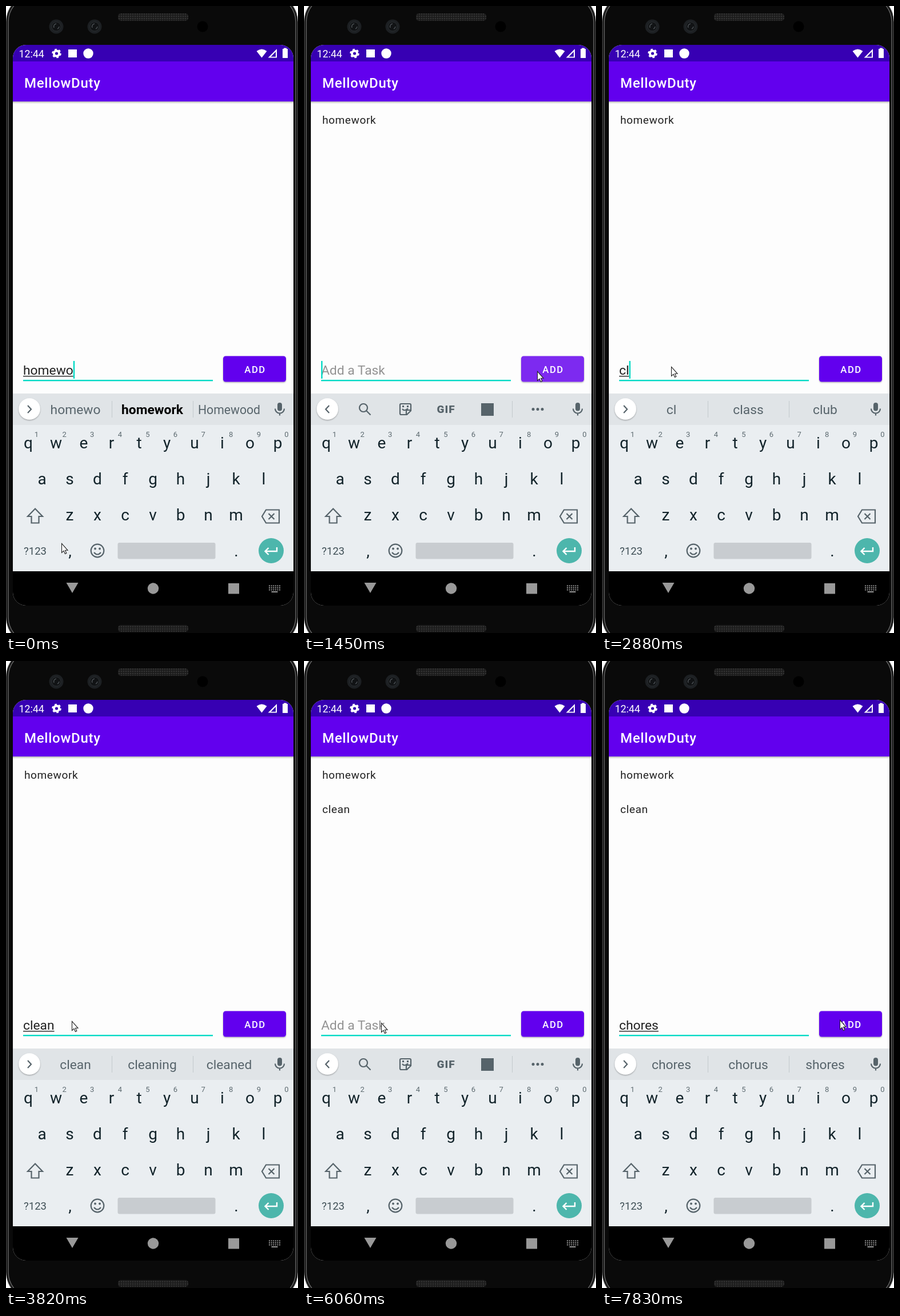
Animation of 511 by 1097 pixels, one loop 8000 ms. Source, as an HTML page:

```html
<!DOCTYPE html>
<html lang="en">
<head>
<meta charset="utf-8">
<title>To-do app</title>
<style>
html, body { margin: 0; width: 100%; height: 100%; overflow: hidden; background: #fff; }
svg { display: block; width: 511px; height: 1097px; font-family: Roboto, sans-serif; }
.mid { text-anchor: middle; }
.key { font-size: 28px; fill: #12232a; }
.digit { font-size: 13px; fill: #5d6a70; }
.line { fill: none; stroke: #56636a; stroke-width: 2.2; }
.grey { fill: #56636a; }
.white { fill: #fff; }
.item { font-size: 19.1px; letter-spacing: .03em; fill: #212121; }
.entry, .word { font-size: 22.8px; }
.word { fill: #57646b; text-anchor: middle; }
</style>
</head>
<body>
<svg viewBox="0 0 511 1097">
  <defs>
    <clipPath id="screen"><rect x="12" y="68" width="491" height="981" rx="23"/></clipPath>
    <filter id="soft" x="-20%" y="-20%" width="140%" height="150%">
      <feDropShadow dx="0" dy="1.2" stdDeviation="1.2" flood-opacity=".35"/>
    </filter>
    <linearGradient id="shade" x2="0" y2="1">
      <stop stop-opacity=".28"/><stop offset="1" stop-opacity="0"/>
    </linearGradient>
    <pattern id="mesh" width="4" height="4" patternUnits="userSpaceOnUse">
      <rect width="4" height="4" fill="#1b1b1b"/><circle cx="2" cy="2" r="1.3" fill="#343434"/>
    </pattern>
    <g id="lens">
      <circle r="12.5" fill="#1d2023"/><circle r="8" fill="#111315" stroke="#2b2f32"/>
      <path d="M-4 2A5 5 0 0 1 0-5M2 4A5 5 0 0 0 5 0" fill="none" stroke="#4a4f53" stroke-width="1.5"/>
    </g>
  </defs>

  <!-- Phone body -->
  <rect y="-22" width="511" height="1141" rx="50" fill="#3c3c3c"/>
  <rect x="1.5" y="-20" width="508" height="1137" rx="48" fill="#0c0c0c"/>
  <rect x="4" y="-18" width="503" height="1133" rx="46" fill="#0a0a0a" stroke="#626262" stroke-width="1.5"/>
  <rect x="196" y="13" width="123" height="13" rx="5" fill="url(#mesh)"/>
  <rect x="196" y="1083" width="123" height="12" rx="5" fill="url(#mesh)"/>
  <use href="#lens" x="88" y="36"/><use href="#lens" x="155" y="36"/>
  <circle cx="344" cy="36" r="9.5"/>

  <g clip-path="url(#screen)">
    <rect x="12" y="68" width="491" height="981" fill="#fdfdfd"/>
    <rect x="12" y="167" width="491" height="4" fill="url(#shade)"/>
    <rect x="12" y="68" width="491" height="30" fill="#3700b3"/>
    <rect x="12" y="97" width="491" height="70" fill="#6200ee"/>
    <rect x="12" y="678" width="491" height="55" fill="#e0e4e7"/>
    <rect x="12" y="733" width="491" height="256" fill="#eaeef1"/>
    <rect x="12" y="989" width="491" height="60"/>
  </g>

  <!-- Status and app bars -->
  <g class="white">
    <text x="22.5" y="90" font-size="17.8">12:44</text>
    <circle cx="88.5" cy="83" r="4.6" fill="none" stroke="#fff" stroke-width="4"/>
    <circle cx="88.5" cy="83" r="7" fill="none" stroke="#fff" stroke-width="2.6" stroke-dasharray="3.67"/>
    <rect x="109" y="76" width="15" height="14"/>
    <circle cx="144" cy="83" r="8.7"/>
    <path d="M438.500 79Q447.500 72 456.500 79L447.500 90.500Z"/>
    <path d="M474 75V90.500H458.500ZM472 80L463.500 88.700H472Z" fill-rule="evenodd"/>
    <path d="M486 75V73.500H491V75H493V91H484V75Z"/>
    <text x="32" y="142.500" font-size="24" font-weight="500" letter-spacing=".03em">MellowDuty</text>
  </g>

  <!-- Task list and entry row -->
  <text class="item" x="32" y="205.500" id="item1">homework</text>
  <text class="item" x="32" y="265.500" id="item2">clean</text>
  <text class="entry" x="30" y="645" id="entry"></text>
  <rect x="30" y="647" height="1.400" fill="#212121" id="composing"/>
  <rect x="30" y="654" width="332" height="2.400" fill="#03dac5"/>
  <rect y="621" width="2.400" height="31" fill="#03dac5" id="caret"/>
  <rect x="380" y="612.500" width="110" height="45" rx="4.500" filter="url(#soft)" id="button"/>
  <text class="mid white" x="436" y="642" font-size="16.700" font-weight="500" letter-spacing=".09em">ADD</text>

  <!-- Suggestion strip -->
  <circle class="white" cx="41" cy="705" r="18.800" filter="url(#soft)"/>
  <path class="line" stroke-width="2.500" id="chevron"/>
  <g id="words">
    <path d="M185.500 691V720M327.500 691V720" stroke="#c3c9cd"/>
    <text class="word" y="714"></text><text class="word" y="714"></text><text class="word" y="714"></text>
  </g>
  <g id="tools">
    <path d="M364.500 691V720" stroke="#c3c9cd"/>
    <circle class="line" cx="104" cy="703" r="7"/>
    <path class="line" d="M109 708L116.500 715.500"/>
    <path class="line" d="M170 696H185Q187 696 187 698V708L180 715H170Q168 715 168 713V698Q168 696 170 696ZM187 707H181Q179 707 179 709V715M172 705Q176 710 182 704"/>
    <path class="grey" d="M172 699H175V702H172ZM180 699H183V702H180Z"/>
    <text class="mid grey" x="248.500" y="712" font-size="19" font-weight="900" letter-spacing=".05em">GIF</text>
    <rect class="grey" x="310" y="695" width="22" height="22"/>
    <g class="grey"><circle cx="401" cy="705.500" r="2.500"/><circle cx="409" cy="705.500" r="2.500"/><circle cx="417" cy="705.500" r="2.500"/></g>
  </g>
  <rect class="grey" x="475" y="694" width="8" height="14.500" rx="4"/>
  <path class="line" d="M471 704.500A7.800 7.800 0 0 0 487 704.500M479 712V716.500"/>

  <!-- Keyboard -->
  <g id="keys"></g>
  <path class="line" d="M51 879.500L64 893H57.500V904.500H44.500V893H38Z"/>
  <path class="line" d="M455 881.500H478V904.500H455L448 893ZM459.500 888L469.500 898M469.500 888L459.500 898"/>
  <text class="mid" x="51" y="960" font-size="18.500" fill="#3f4f56">?123</text>
  <circle class="line" cx="160" cy="953" r="11.300"/>
  <circle class="grey" cx="156" cy="949.500" r="1.900"/><circle class="grey" cx="164" cy="949.500" r="1.900"/>
  <path class="line" d="M154 956Q160 963 166 956"/>
  <rect x="195.500" y="939" width="171" height="28.500" rx="3" fill="#c8ccd0"/>
  <circle cx="464" cy="953" r="22" fill="#4db6ac"/>
  <path d="M474 947V954H454M459.500 948L453.500 954L459.500 960" fill="none" stroke="#fff" stroke-width="2.400"/>

  <!-- Navigation bar -->
  <path d="M105.500 1009H126.500L116 1027ZM389 1010H408V1028.500H389Z" fill="#999"/>
  <circle cx="257.500" cy="1019" r="9.700" fill="#999"/>
  <path d="M460 1014.500H480M460 1018H480M460 1021.500H480" stroke="#999" stroke-width="2" stroke-dasharray="2 1.600"/>
  <path d="M464.500 1025H475.500" stroke="#999" stroke-width="2"/>

  <path id="mouse" d="M.5.500V16.500L4 13.200L6.400 18.500L8.800 17.400L6.500 12.300H11Z" fill="#fff" stroke="#222" stroke-width="1.100"/>
</svg>
<script>
const $ = id => document.getElementById(id);
const LOOP = 8000;

// Each track lists [start time, value]; a value holds until the next start.
const typed = [[0, 'homewo'], [120, 'homewor'], [240, 'homework'], [1450, ''],
  [2750, 'c'], [2880, 'cl'], [3020, 'cle'], [3150, 'clea'], [3270, 'clean'], [4470, ''],
  [6460, 'c'], [6610, 'cho'], [6760, 'chor'], [7030, 'chore'], [7150, 'chores']];
const caretOn = [[0, 1], [760, 0], [1150, 1], [1970, 0], [2370, 1], [3820, 0],
  [4350, 1], [5130, 0], [5660, 1], [6060, 0], [6460, 1], [7710, 0]];
const buttonFill = [[0, '#6200ee'], [1450, '#7d2af0'], [1700, '#6200ee'],
  [4470, '#7d2af0'], [4850, '#6e15ef'], [4980, '#6200ee']];
const pointer = [[0, [97, 940]], [640, [150, 850]], [760, [285, 660]], [880, [324, 603]],
  [1030, [360, 615]], [1150, [403, 635]], [1300, [408, 639]], [1580, [290, 675]],
  [1700, [124, 713]], [1840, [122, 665]], [1970, [121, 631]], [3820, [115, 630]],
  [3940, [118, 631]], [4090, [330, 632]], [4220, [482, 637]], [4350, [440, 638]],
  [4580, [400, 637]], [4700, [209, 633]], [4850, [150, 633]], [4980, [135, 633]],
  [7710, [290, 631]], [7830, [416, 628]]];

// A leading * marks the autocorrect choice.
const suggestions = {
  homewo: 'homewo *homework Homewood', homewor: 'homewor *homework homeworks',
  homework: 'homework homeworks homeworking',
  c: 'c can come', cl: 'cl class club', cle: 'cle clean clear',
  clea: 'clea *clean clear', clean: 'clean cleaning cleaned',
  cho: 'cho choose chocolate', chor: 'chor chorus chores',
  chore: 'chore chores choreograph', chores: 'chores chorus shores'
};
const slots = [[121.5, 112], [256, 132], [390.5, 109]]; // centre, room

const at = (track, t) => track.findLast(([start]) => start <= t)[1];
const show = (el, on) => el.setAttribute('visibility', on ? 'visible' : 'hidden');

function buildKeys() {
  const label = (cls, x, y, s) => `<text class="mid ${cls}" x="${x}" y="${y}">${s}</text>`;
  const row = (letters, x, y) => [...letters].map((c, i) => label('key', x + i * 48.5, y, c)).join('');
  const digits = [...'1234567890'].map((c, i) => label('digit', 53.5 + i * 48.6, 754, c)).join('');
  $('keys').innerHTML = row('qwertyuiop', 39, 774) + row('asdfghjkl', 63, 837) +
    row('zxcvbnm', 111.5, 900) + label('key', 112, 963, ',') + label('key', 403, 963, '.') + digits;
}

function setWords(text) {
  const words = suggestions[text].split(' ');
  $('words').querySelectorAll('text').forEach((el, i) => {
    const strong = words[i][0] === '*';
    const [x, room] = slots[i];
    el.textContent = words[i].replace('*', '');
    el.style.fontWeight = strong ? 700 : 400;
    el.style.fill = strong ? '#000' : '';
    const squeeze = Math.min(1, room / el.getComputedTextLength());
    el.setAttribute('transform', `translate(${x}) scale(${squeeze} 1)`);
  });
}

let shown = null, textWidth = 0;
function setText(text) {
  if (text === shown) return;
  shown = text;
  const entry = $('entry');
  entry.textContent = text || 'Add a Task';
  entry.setAttribute('fill', text ? '#212121' : '#939393');
  textWidth = text ? entry.getComputedTextLength() : 0;
  $('composing').setAttribute('width', textWidth);
  $('chevron').setAttribute('d', text ? 'M38 699L44 705.500L38 712' : 'M44 699L38 705.500L44 712');
  show($('words'), text);
  show($('tools'), !text);
  if (text) setWords(text);
}

function draw() {
  const t = performance.now() % LOOP;
  setText(at(typed, t));
  $('caret').setAttribute('x', 30 + textWidth);
  show($('caret'), at(caretOn, t));
  show($('item1'), t >= 1450);
  show($('item2'), t >= 4470);
  $('button').setAttribute('fill', at(buttonFill, t));
  $('mouse').setAttribute('transform', `translate(${at(pointer, t)})`);
  requestAnimationFrame(draw);
}

buildKeys();
draw();
</script>
</body>
</html>
```
